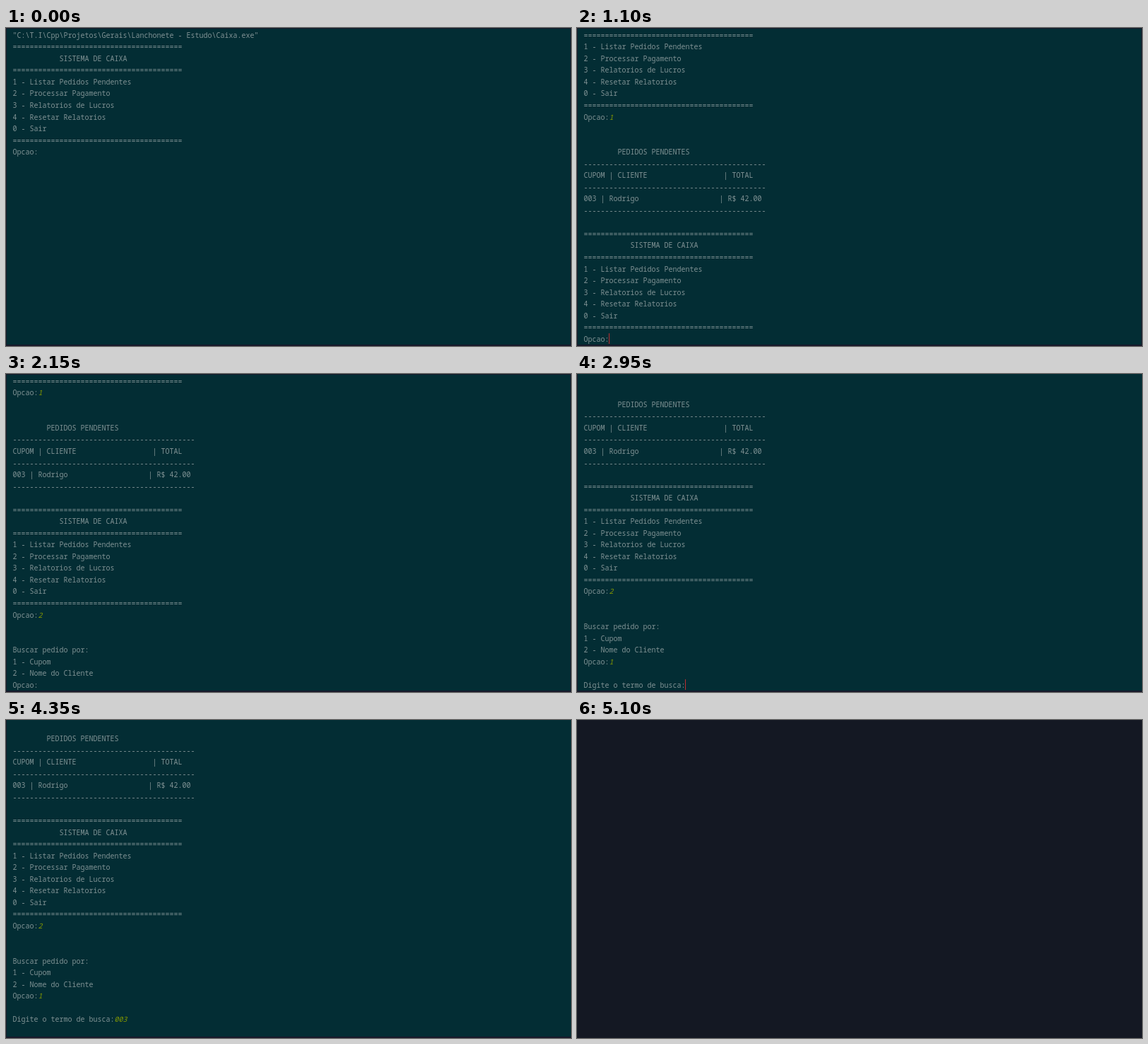
These frames come from a looping animation (800 by 450 pixels, 5.15 s). An HTML page:

```html
<!DOCTYPE html>
<html lang="pt">
<head>
<meta charset="utf-8">
<title>Sistema de caixa</title>
<style>
  html, body { margin: 0; width: 100%; height: 100%; overflow: hidden; background: #141823; }
  #terminal {
    position: absolute; left: 0; top: 0; width: 800px; height: 450px;
    overflow: hidden; background: #032d34;
  }
  #edge {
    position: absolute; inset: 0; box-sizing: border-box;
    border: solid #17192a; border-width: 0 0 2px 1px;
  }
  #edge.framed { border-width: 1px 1px 2px 1px; }
  .line {
    position: absolute; left: 9.5px; height: 16.54px; white-space: pre;
    font: 10px/16.54px "Noto Sans Mono", "DejaVu Sans Mono", monospace;
    font-variant-ligatures: none; color: #7f9193;
  }
  .typed { color: #859900; font-style: italic; }
  #caret { position: absolute; width: 1.3px; height: 15px; background: #bd2d30; }
</style>
</head>
<body>
<div id="terminal">
  <div id="lines"></div>
  <div id="caret"></div>
  <div id="edge"></div>
</div>
<script>
const LOOP = 5150, BLANK_AT = 5100, UNFRAMED_AT = 2900;
const ROW = 16.54, CHAR = 6, LEFT = 9.5, LAST_ROW = 26;

const double = "=".repeat(40), dashes = "-".repeat(43);
const menu = [
  double, " ".repeat(11) + "SISTEMA DE CAIXA", double,
  "1 - Listar Pedidos Pendentes", "2 - Processar Pagamento",
  "3 - Relatorios de Lucros", "4 - Resetar Relatorios", "0 - Sair",
  double, "Opcao:"
].join("\n");
const orders = [
  "", "", " ".repeat(8) + "PEDIDOS PENDENTES", dashes,
  "CUPOM | CLIENTE".padEnd(33) + "| TOTAL", dashes,
  "003 | Rodrigo".padEnd(32) + "| R$ 42.00", dashes, "", ""
].join("\n");
const search = "\n\nBuscar pedido por:\n1 - Cupom\n2 - Nome do Cliente\nOpcao:";
const receipt = [
  "", dashes, "Cupom: 003", "Cliente: Rodrigo", "Total: R$ 42.00",
  "Itens: Smash onions,Refrigerante 2l", dashes, "Confirmar pagamento (S/N)?"
].join("\n");

const print = (at, text) => ({ at, text });
const type = (at, text) => ({ at, text, typed: true });
const enter = at => print(at, "\n");

const session = [
  print(0, '"C:\\T.I\\Cpp\\Projetos\\Gerais\\Lanchonete - Estudo\\Caixa.exe"\n' + menu),
  type(50, "1"), enter(300), print(450, orders + menu),
  type(1400, "2"), enter(1500), print(1600, search),
  type(2600, "1"), enter(2750), print(2900, "\nDigite o termo de busca:"),
  type(3500, "0"), type(3700, "0"), type(3900, "3"),
  enter(4200), print(4650, receipt)
];

// Spans of time in which the caret is lit.
const caretOn = [
  [50, 300], [350, 600], [850, 1150], [1350, 1600], [1850, 2100], [2400, 2650],
  [2900, 3150], [3350, 3600], [3850, 4100], [4400, 4600], [4850, 5100]
];

const get = id => document.getElementById(id);
const terminal = get("terminal"), lines = get("lines"), caret = get("caret"), edge = get("edge");
let shown = 0;

function element(tag, className, text) {
  const node = document.createElement(tag);
  node.className = className;
  node.textContent = text;
  return node;
}

function showSession(count) {
  const rows = [element("div", "line", "")];
  for (const { text, typed } of session.slice(0, count)) {
    text.split("\n").forEach((part, i) => {
      if (i) rows.push(element("div", "line", ""));
      rows[rows.length - 1].append(typed ? element("span", "typed", part) : part);
    });
  }
  const last = rows.length - 1;
  const scroll = Math.max(0, last - LAST_ROW);
  const top = i => 1.73 + (i - scroll) * ROW;
  rows.forEach((row, i) => row.style.top = top(i) + "px");
  lines.replaceChildren(...rows.slice(scroll));
  caret.style.left = LEFT - 0.6 + rows[last].textContent.length * CHAR + "px";
  caret.style.top = Math.round(top(last)) + "px";
}

function draw() {
  const time = performance.now() % LOOP;
  const count = session.filter(step => step.at <= time).length;
  if (count !== shown) showSession(shown = count);
  caret.hidden = !caretOn.some(([from, to]) => time >= from && time < to);
  caret.style.display = caret.hidden ? "none" : "block";
  edge.className = time < UNFRAMED_AT ? "framed" : "";
  terminal.style.visibility = time < BLANK_AT ? "visible" : "hidden";
  requestAnimationFrame(draw);
}
draw();
</script>
</body>
</html>
```
